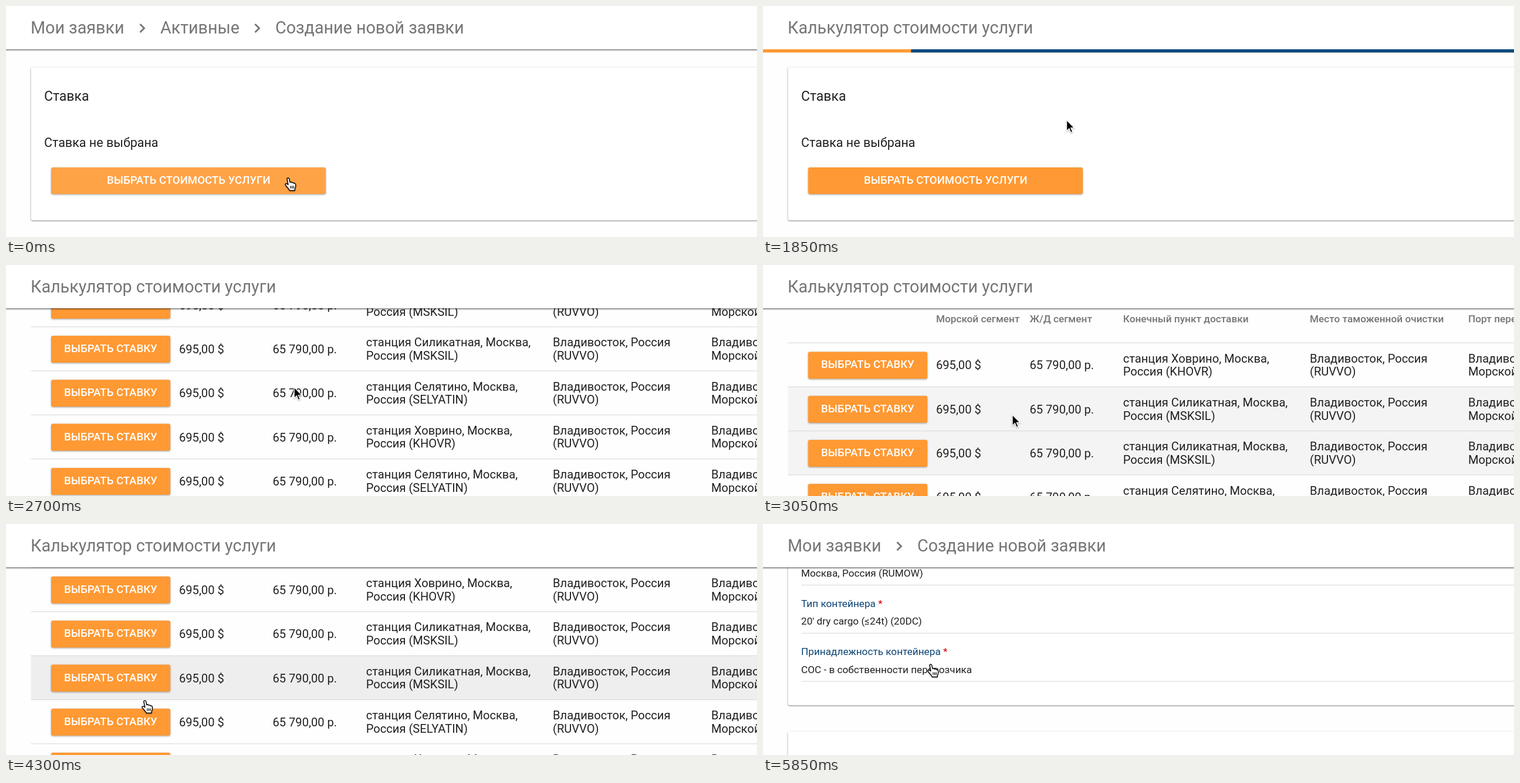
Animation of 1280 by 395 pixels, one loop 5900 ms. Source, as an HTML page:

```html
<!DOCTYPE html>
<html lang="ru">
<head>
<meta charset="utf-8">
<title>Калькулятор стоимости услуги</title>
<style>
html, body { margin: 0; width: 100%; height: 100%; overflow: hidden; background: #fefefe; }
svg { display: block; width: 1280px; height: 395px; font-family: Roboto, sans-serif; }
text { white-space: pre; fill: #212121; }
.title { fill: #757575; font-size: 28.7px; }
.th { fill: #757575; font-size: 17.2px; font-weight: 500; }
.td { font-size: 20.1px; }
.btn { font-size: 18.6px; font-weight: 500; fill: #fff; }
.field { font-size: 17.2px; }
.label { font-size: 17.2px; fill: #0b4375; }
.card { fill: #fff; filter: drop-shadow(0 1px 1.3px rgba(0,0,0,.5)); }
.raised { filter: drop-shadow(0 1.5px 1.5px rgba(0,0,0,.38)); }
.bar { fill: #fff; filter: drop-shadow(0 1px 1.7px rgba(0,0,0,.75)); }
.line { fill: #dcdcdc; }
.chevron { fill: none; stroke: #757575; stroke-width: 2.8; }
#cursor { filter: drop-shadow(0 1px 1px rgba(0,0,0,.35)); }
</style>
</head>
<body>
<svg id="stage" viewBox="0 0 1280 395"></svg>
<script>
const LOOP = 5900, STEP = 50, ROW = 75.3;
const ORANGE = [255, 153, 51], HOVER = [255, 163, 71], OFF = [224, 224, 224];
const $ = id => document.getElementById(id);

const text = (x, y, cls, s) => `<text x="${x}" y="${y}" class="${cls}">${s}</text>`;
const rect = (x, y, w, h, attrs) => `<rect x="${x}" y="${y}" width="${w}" height="${h}" ${attrs}/>`;
const line = (x, y) => rect(x, y, 1300, 1.2, 'class="line"');
const card = (y, h) => rect(42.5, y, 1300, h, 'rx="3" class="card"');
const chevron = x => `<path class="chevron" d="M${x} 31l7 7l-7 7"/>`;
const group = (id, body) => `<g id="${id}">${body}</g>`;

const stations = {
  k: ['Ховрино', 'KHOVR'],
  m: ['Силикатная', 'MSKSIL'],
  s: ['Селятино', 'SELYATIN']
};
const order = [...'kmmskskmsmks'];

// Row coordinates are relative to the line above the row.
function row(key, i) {
  const [name, code] = stations[key];
  return `<g transform="translate(0 ${i * ROW})">` +
    rect(42.5, 0, 1300, ROW, `id="row${i}"`) + line(42.5, -.6) +
    rect(77, 15.3, 203, 46, `rx="3" class="raised" id="btn${i}"`) +
    text(99, 43.4, 'btn pick', 'ВЫБРАТЬ СТАВКУ') +
    text(295, 45.4, 'td', '695,00 $') +
    text(454.5, 45.4, 'td', i < 6 ? '65 790,00 р.' : '1 025,00 $') +
    text(613.8, 33.6, 'td', `станция ${name}, Москва,`) +
    text(613.8, 56.2, 'td', `Россия (${code})`) +
    text(932, 33.6, 'td', 'Владивосток, Россия') +
    text(932, 56.2, 'td', '(RUVVO)') +
    text(1202, 33.6, 'td', 'Владивосток,') +
    text(1202, 56.2, 'td', 'Морской порт') + '</g>';
}

const heads = [[295, 'Морской сегмент'], [454.5, 'Ж/Д сегмент'], [613.8, 'Конечный пункт доставки'],
  [932, 'Место таможенной очистки'], [1202, 'Порт перевалки']];
const star = ' <tspan fill="#d50000">*</tspan>';

$('stage').innerHTML =
  group('rate', card(104.5, 262) +
    text(65, 162, '" font-size="23', 'Ставка') +
    text(65, 240.5, '" font-size="21.5', 'Ставка не выбрана') +
    rect(77, 276, 468, 45.5, 'rx="3" class="raised" id="main"') +
    text(172, 304, 'btn', 'ВЫБРАТЬ СТОИМОСТЬ УСЛУГИ')) +
  group('table', heads.map(([x, s]) => text(x, -34.6, 'th', s)).join('') + order.map(row).join('')) +
  group('form', card(20, 290) + card(354.5, 200) +
    text(65, 90, 'field', 'Москва, Россия (RUMOW)') + line(65.5, 103.8) +
    text(65, 142, 'label', 'Тип контейнера' + star) +
    text(65, 172, 'field', "20' dry cargo (≤24t) (20DC)") + line(65.5, 186.2) +
    text(65, 224.3, 'label', 'Принадлежность контейнера' + star) +
    text(65, 254.5, 'field', 'СОС - в собственности перевозчика') + line(65.5, 268.4)) +
  rect(-10, -10, 1300, 84, 'class="bar"') +
  group('crumbs', text(42, 47, 'title', 'Мои заявки') + chevron(228.5) +
    group('long', text(263, 47, 'title', 'Активные') + chevron(424.5) +
      text(459, 47, 'title', 'Создание новой заявки')) +
    group('short', text(263, 47, 'title', 'Создание новой заявки'))) +
  group('calc', text(42, 47, 'title', 'Калькулятор стоимости услуги')) +
  group('progress', rect(0, 74, 1280, 5.5, 'fill="#ff9933"') + rect(0, 74, 0, 5.5, 'fill="#0a4a7f" id="fill"')) +
  group('cursor',
    group('arrow', '<path d="M0 0V18.7L4.3 14.6L7.2 21.6L10.2 20.3L7.3 13.5H13.2Z" stroke="#fff" stroke-width="1.3"/>') +
    group('beam', '<path d="M-4.5 -10.5Q0 -10.5 0 -7.5Q0 -10.5 4.5 -10.5M0 -8V8M-2.5 1.5H2.5M-4.5 10.5Q0 10.5 0 7.5Q0 10.5 4.5 10.5" fill="none" stroke="#222" stroke-width="1.7"/>') +
    group('hand', `<g transform="translate(-5 -1)" stroke="#000" stroke-width="1.4" stroke-linejoin="round">
      <path fill="#fff" d="M4 2.2C4.6.6 7 .6 7.6 2.4L9 8.6C10 7.6 11.8 7.8 12.3 9.2C13.4 8.4 15 8.8 15.3 10.2C16.8 9.6 18.4 10.4 18.6 12.2C19.2 15.4 18.4 17.6 17.2 20V22.5H8.4C7.6 20 5 17.6 2.6 14.8C.6 12.8.8 11 2.4 10.8C3.8 10.6 5 11.6 6 12.6Z"/>
      <path fill="none" stroke-width="1.2" d="M10 14.5v4.5M12.6 14.5v4.5M15.2 14.5v4.5"/></g>`));

const clamp = p => Math.max(0, Math.min(1, p));
const mix = (a, b, p) => a + (b - a) * p;
const color = (a, b, p) => `rgb(${a.map((v, i) => Math.round(mix(v, b[i], p)))})`;
const smooth = p => p * p * (3 - 2 * p);
const glide = p => 1 - (1 - p) ** 2.5;
const show = (id, on) => $(id).setAttribute('display', on ? 'inline' : 'none');

// Value of keyed list [time, value] at t
function track(keys, t, ease) {
  let i = 0;
  while (i < keys.length - 2 && t >= keys[i + 1][0]) i++;
  const [t0, a] = keys[i], [t1, b] = keys[i + 1];
  return mix(a, b, ease(clamp((t - t0) / (t1 - t0))));
}

const path = [[0, 480, 294], [450, 480, 294], [900, 517.5, 195], [2000, 517.5, 195], [2150, 519.5, 189],
  [2500, 519.5, 189], [3050, 425, 256], [3350, 425, 256], [4050, 245, 309], [4250, 236, 304],
  [4800, 229, 210], [5650, 229, 210], [5850, 285, 240]];
const pathX = path.map(([t, x]) => [t, x]), pathY = path.map(([t, , y]) => [t, y]);
const scroll = [[2080, 148.5], [2450, -281], [2480, -300], [3250, 148.5], [4200, 148.5], [4800, -53.5]];
const hovers = [[2, 2780, 2980], [1, 2920, 3750], [2, 3750, 4550], [3, 4550, 5900]];

const hoverLevel = (i, t) => Math.max(0, ...hovers.filter(h => h[0] === i)
  .map(([, on, off]) => Math.min(clamp((t - on) / 200), 1 - clamp((t - off) / 200))));

function draw(t) {
  const onTable = t >= 2050 && t < 5700, onForm = t >= 5700, calc = t >= 350 && !onForm;
  show('rate', t < 2050);
  show('table', onTable);
  show('form', onForm);
  show('calc', calc);
  show('crumbs', !calc);
  show('long', !calc && !onForm);
  show('short', onForm);
  show('progress', calc && !onTable);

  const head = 1257 * clamp((t - 620) / 380) ** 1.5 + (t > 1000 ? 100 : 0);
  const tail = 399 * clamp((t - 1430) / 570) ** 1.5;
  $('fill').setAttribute('x', tail);
  $('fill').setAttribute('width', Math.max(0, Math.min(1280, head) - tail));
  $('main').setAttribute('fill', color(HOVER, ORANGE, clamp((t - 550) / 300)));

  if (onTable) {
    $('table').setAttribute('transform', `translate(0 ${track(scroll, t, glide)})`);
    const off = clamp((t - 5050) / 400);
    order.forEach((_, i) => {
      const base = i === 3 && t > 4750 ? HOVER : ORANGE;
      $('row' + i).setAttribute('fill', color([254, 254, 254], [238, 238, 238], hoverLevel(i, t)));
      $('btn' + i).setAttribute('fill', color(base, OFF, off));
      $('btn' + i).style.filter = off === 1 ? 'none' : '';
    });
    for (const el of document.querySelectorAll('.pick')) el.style.fill = color([255, 255, 255], [166, 166, 166], off);
  }

  const x = track(pathX, t, smooth), y = track(pathY, t, smooth);
  const hand = t < 1000 && y > 276 || t >= 4100;
  const beam = t >= 2150 && t < 2600;
  $('cursor').setAttribute('transform', `translate(${x} ${y})`);
  show('hand', hand);
  show('beam', beam);
  show('arrow', !hand && !beam);
}

const start = performance.now();
function tick() {
  const t = (performance.now() - start) % LOOP;
  draw(Math.floor(t / STEP) * STEP);
  requestAnimationFrame(tick);
}
tick();
</script>
</body>
</html>
```
